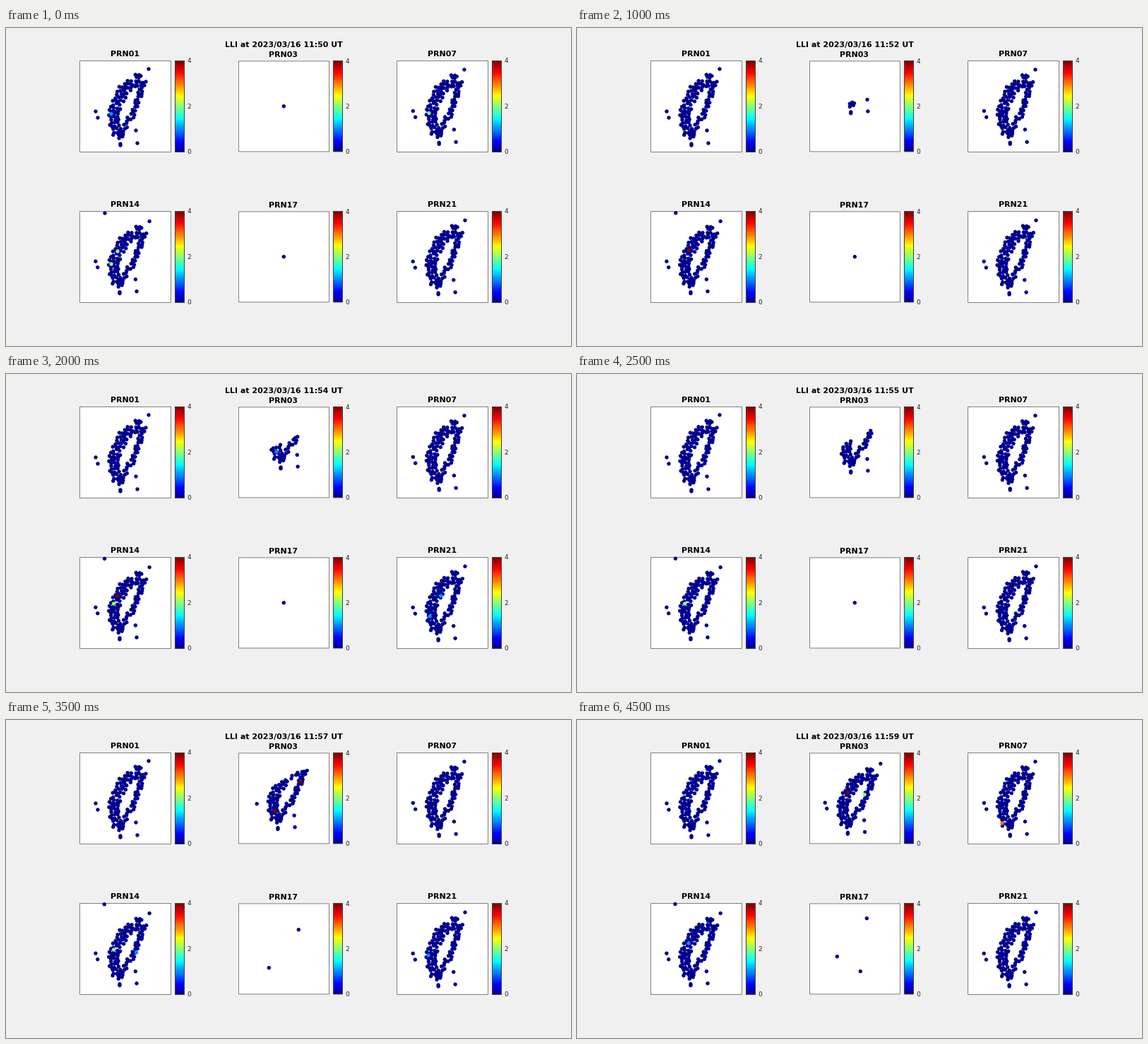
Recreate the animation shown at these times as a matplotlib script. Size 800 by 450 pixels, loop 5 s.

```python
import numpy as np
import matplotlib.pyplot as plt
from matplotlib.animation import FuncAnimation
from matplotlib.patches import Rectangle

W, H, DPI = 800, 450, 100
FRAMES, STEP = 10, 500
PX = 72 / DPI

plt.rcParams["font.family"] = "DejaVu Sans"
fig = plt.figure(figsize=(W / DPI, H / DPI), dpi=DPI, facecolor="#f0f0f0")
ax = fig.add_axes([0, 0, 1, 1])
ax.axis("off")

# 64-step jet map
level = np.arange(1, 65) / 64
JET = np.clip([1.5 - abs(4 * level - c) for c in (3, 2, 1)], 0, 1).T

# Middle of the upper left panel, and steps to the other panels
MID = np.array([168.7, 110.7])
COLS, ROW = (0, 224.6, 449), 213

# Isolated stations, then two bands that make up the island
LONE = [(202, 58), (198, 76), (127, 118), (130, 127), (184, 145),
        (186, 163), (162, 164), (162, 166)]
WEST = [(181, 85), (167, 92), (155, 116), (151, 133), (156, 153)]
EAST = [(185, 71), (192, 86), (186, 108), (181, 126), (173, 136), (162, 160)]


def band(keys, count, half, gap, rng):
    """Scatter points around a polyline, no two closer than gap."""
    keys = np.array(keys, float)
    dist = np.r_[0, np.cumsum(np.hypot(*np.diff(keys, axis=0).T))]
    points = []
    for _ in range(4000):
        at = rng.uniform(0, dist[-1])
        p = np.array([np.interp(at, dist, k) for k in keys.T])
        p += rng.uniform(-half, half, 2)
        if all(np.hypot(*(p - q)) > gap for q in points):
            points.append(p)
        if len(points) == count:
            break
    return np.array(points)


rng = np.random.default_rng(11)
cloud = np.vstack([band(WEST, 72, 7, 3.2, rng), band(EAST, 46, 3.5, 2.8, rng)])
cloud += MID - np.vstack([cloud, LONE]).mean(axis=0)
island = np.vstack([cloud, LONE])


def centred(points, col, row):
    """Each panel is centred on the mean of its stations."""
    points = np.asarray(points, float)
    return points - points.mean(axis=0) + MID + (COLS[col], ROW * row)


def view(lean, squash):
    """The island as seen along another line of sight."""
    x, y = island.T
    return np.c_[x + lean * (y - MID[1]), y * (1 - squash)]


prn03 = view(-0.06, 0.08)
fixed = np.vstack([island,
                   centred(view(0.04, 0.025), 2, 0),
                   centred(view(-0.02, 0.055), 0, 1),
                   centred(view(0.02, 0.03), 2, 1)])

# PRN03 fills in from the south-east, the far western stations late
rank = island @ (0.6, 1) - 14 * (island[:, 0] < 140)
PRN17 = [(368, 334.5), (410, 280.5), (401, 355.5)]

# Flagged stations: x, y, first minute, last minute, value
FLAGS = [
    (149, 121.5, 0, 0, 1), (599, 120.5, 0, 0, 2),
    (149, 334, 0, 0, 2), (158, 316, 0, 1, 2), (158, 314.5, 2, 4, 4),
    (152.5, 325, 3, 8, 2), (158, 315, 6, 6, 1), (184.5, 329, 6, 8, 1),
    (158, 316, 8, 8, 4), (158, 316, 9, 9, 1),
    (383, 110, 4, 4, 1), (417, 87.5, 6, 7, 4), (381, 129, 7, 7, 4),
    (383, 102.5, 8, 9, 4), (379, 135, 8, 8, 2), (407, 105.5, 9, 9, 2),
    (601.5, 146.5, 6, 6, 4), (600, 121, 8, 8, 4), (602, 146, 9, 9, 3),
    (616, 314, 4, 4, 1), (600, 343, 4, 4, 1), (598, 333, 7, 8, 1),
]


def label(px, py, text, size=11, **kw):
    return ax.text(px, py, text, fontsize=size * PX, **kw)


def frame(left, top, width, height, edge, face="none"):
    ax.add_patch(Rectangle((left, top), width, height, facecolor=face,
                           edgecolor=edge, linewidth=PX, snap=False))


def panel(name, left, top, size, title_y):
    bar = left + size + 6
    frame(left, top, size, size, "#808080", "white")
    label(left + size / 2 - 0.8, title_y, name, weight="bold", ha="center")
    ax.imshow(JET[:, None], origin="lower", aspect="auto",
              interpolation="nearest", zorder=0.9,
              extent=(bar - 0.5, bar + 13.5, top + size + 0.5, top - 0.5))
    frame(bar, top, 13, size, "#404040")
    for v in (0, 2, 4):
        label(bar + 17, top + size * (1 - v / 4) + 2.8, str(v), 9,
              color="#262626")


names = ["PRN01", "PRN03", "PRN07", "PRN14", "PRN17", "PRN21"]
for n, name in enumerate(names):
    row, col = divmod(n, 3)
    inner = col == 1
    panel(name, 104.5 + round(COLS[col]), 46.5 + ROW * row + 0.4 * inner,
          129 - inner, 40 + ROW * row + inner)

ax.set_xlim(0, W)
ax.set_ylim(H, 0)
clock = label(393.5, 27, "", weight="bold", ha="center")
dots = ax.scatter([], [], s=(5.4 * PX) ** 2, linewidths=0, zorder=3)


def draw(i):
    clock.set_text(f"LLI at 2023/03/16 11:{50 + i} UT")
    seen = rank > (270 - 11.5 * i if i < 8 else 0)
    known = 1 + (i > 5) + (i > 8)
    calm = np.vstack([fixed,
                      centred(prn03[seen], 1, 0),
                      centred(PRN17[:known], 1, 1),
                      [(140 - i / 9, 262 - i / 6)]])
    flagged = [f for f in FLAGS if f[2] <= i <= f[3]]
    spots = np.array([f[:2] for f in flagged]).reshape(-1, 2)
    values = np.array([0] * len(calm) + [f[4] for f in flagged])
    dots.set_offsets(np.vstack([calm, spots]))
    dots.set_facecolors(JET[np.minimum(values * 16, 63)])
    return clock, dots


anim = FuncAnimation(fig, draw, frames=FRAMES, interval=STEP, repeat=True,
                     repeat_delay=0)
plt.show()
```
